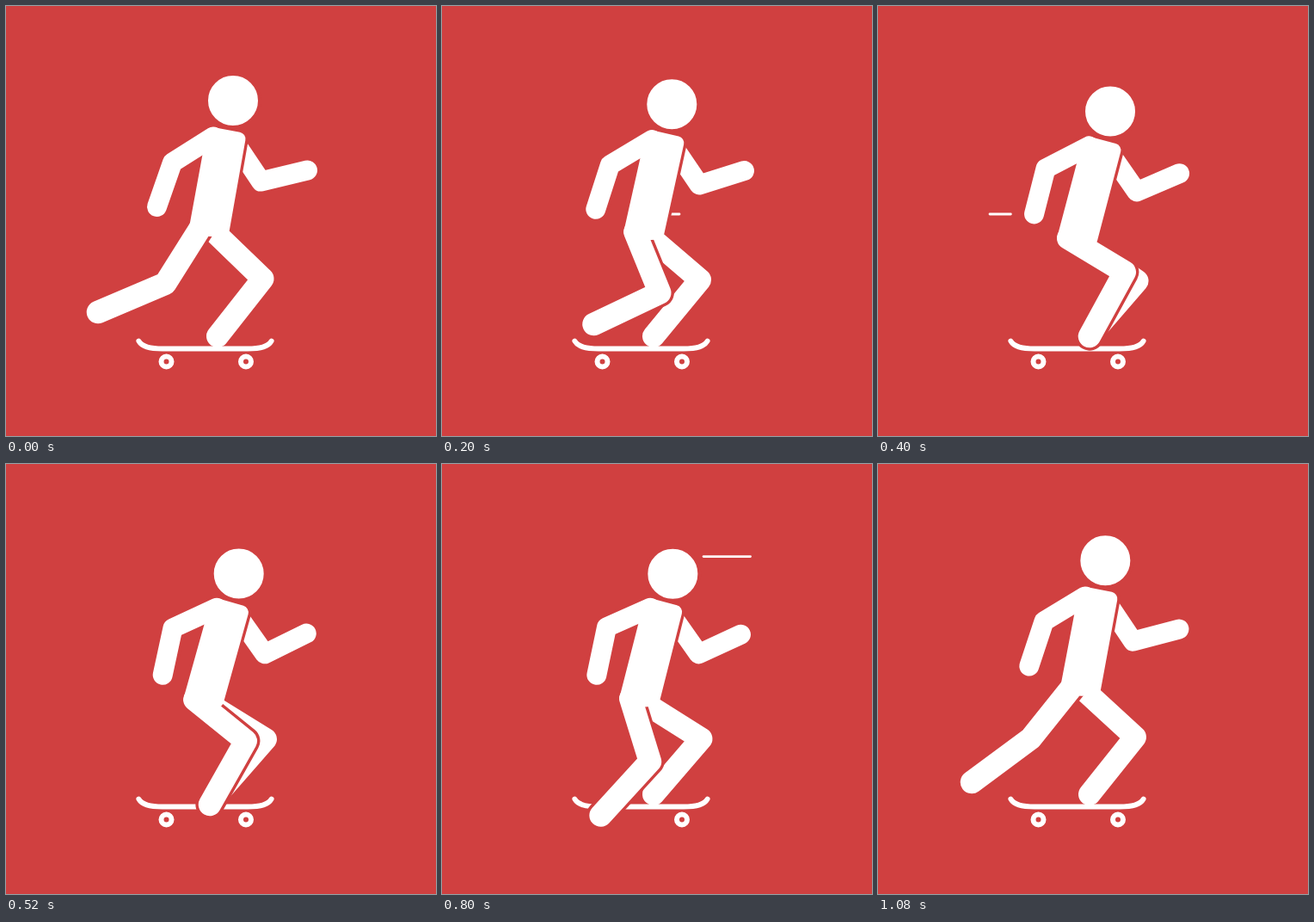
Recreate the animation shown at these times as an HTML page. Size 500 by 500 pixels, loop 1.12 s.

```html
<!DOCTYPE html>
<html lang="en">
<head>
<meta charset="utf-8">
<title>Skateboarder</title>
<style>
  html, body { margin: 0; width: 100%; height: 100%; overflow: hidden; background: #d04040; }
  svg { display: block; width: 100%; height: 100%; }
</style>
</head>
<body>
<svg id="stage" viewBox="0 0 500 500"></svg>
<script>
const RED = '#d04040', WHITE = '#fff';
const LOOP = 1120, STEP = 40, GAP = 6.8;
const THIGH = 76.5, SHIN = 85;
const stage = document.getElementById('stage');

function add(tag, attrs) {
  const el = document.createElementNS('http://www.w3.org/2000/svg', tag);
  for (const key in attrs) el.setAttribute(key, attrs[key]);
  return stage.appendChild(el);
}

const stroke = (color, width, fill = 'none') => ({
  fill, stroke: color, 'stroke-width': width, 'stroke-linecap': 'round', 'stroke-linejoin': 'round'
});
const limb = (width, color = WHITE) => add('polyline', stroke(color, width));
const body = (width, color) => add('polygon', stroke(color, width, color));

// Layers from back to front.
const lowStreak = add('path', stroke(WHITE, 2.8));
const highStreak = add('path', stroke(WHITE, 2.8));
const head = add('circle', { r: 31, fill: WHITE, stroke: RED, 'stroke-width': 4 });
add('path', {
  ...stroke(WHITE, 5.8),
  d: 'M154.3 389.5C158 396 166 398.5 182 398.5H281C297 398.5 305 396 308.7 389.5'
});
for (const cx of [186.5, 279]) add('circle', { cx, cy: 413.5, r: 6, ...stroke(WHITE, 6) });
const frontArm = limb(23);
const torsoEdge = body(16 + GAP, RED);
const farLeg = limb(26);
const backArmEdge = limb(23 + GAP, RED);
const nearLegEdge = limb(26.5 + GAP, RED);
const torso = body(16, WHITE);
const nearLeg = limb(26.5);
const backArm = limb(23);

// The pushing foot: forward onto the board, down, back along the ground, up.
const footPath = [
  [0, 107, 356], [400, 246, 384], [640, 228, 408],
  [920, 152, 409], [1080, 109, 370], [LOOP, 107, 356]
];

function footAt(t) {
  const next = footPath.findIndex(key => key[0] > t);
  const [t0, x0, y0] = footPath[next - 1], [t1, x1, y1] = footPath[next];
  const u = (t - t0) / (t1 - t0);
  return [x0 + (x1 - x0) * u, y0 + (y1 - y0) * u];
}

// Two-bone leg with the knee bent forward.
function leg(hip, foot) {
  const dx = foot[0] - hip[0], dy = foot[1] - hip[1];
  const reach = Math.hypot(dx, dy);
  const along = (THIGH ** 2 - SHIN ** 2 + reach ** 2) / (2 * reach);
  const bend = Math.sqrt(Math.max(0, THIGH ** 2 - along ** 2));
  const knee = shift(hip, (dx * along + dy * bend) / reach, (dy * along - dx * bend) / reach);
  return [hip, knee, foot];
}

const shift = ([x, y], dx, dy) => [x + dx, y + dy];

function place(points, ...shapes) {
  const text = points.map(p => p.map(v => v.toFixed(2)).join()).join(' ');
  for (const shape of shapes) shape.setAttribute('points', text);
}

// A streak's tail leaves 80 ms after its tip; both take 360 ms.
function streak(el, t, start, from, to, y) {
  const at = s => from + (to - from) * Math.min(1, Math.max(0, (t - s) / 360));
  const tip = at(start), tail = at(start + 80);
  el.setAttribute('d', tail - tip > 0.5 ? `M${tip} ${y}H${tail}` : '');
}

function draw(t) {
  // The body sinks, then rises, while swaying forward and back.
  const crouch = Math.max(0, Math.min((t - 100) / 537, (LOOP - t) / 407));
  const sway = Math.sin(2 * Math.PI * t / LOOP);
  const joint = (x, y, sinkX, sinkY, swayX = 0, swayY = 0) =>
    [x + sinkX * crouch + swayX * sway, y + sinkY * crouch + swayY * sway];

  const [headX, headY] = joint(264, 110, 8, 22.5, 2);
  const shoulder = joint(241, 149, 4.5, 19.5, 2.5);
  const hip = joint(226, 258, -8.5, 20, 0, 1);
  const backElbow = joint(193.5, 182, 0, 11, 2, 1);
  const backHand = joint(175.5, 233.5, 8, 15, 2);
  const frontElbow = joint(296.5, 204, 5, 21.5, 2);
  const frontHand = joint(350.5, 191, -2, 8, 1.5, -1);

  const lean = Math.atan2(shoulder[0] - hip[0], hip[1] - shoulder[1]) + 0.05;
  const chest = shift(shoulder, 30 * Math.cos(lean), 30 * Math.sin(lean));

  head.setAttribute('cx', headX);
  head.setAttribute('cy', headY);
  place([shoulder, chest, shift(hip, 26, 1), shift(hip, 12, 2), shift(hip, -5, 0)], torsoEdge, torso);
  place([shift(shoulder, 0, 3), backElbow, backHand], backArmEdge, backArm);
  place([shift(chest, -5, 3), frontElbow, frontHand], frontArm);
  place(leg(hip, footAt(t)), nearLegEdge, nearLeg);
  place(leg(shift(hip, 17.5, 6), [246, 384]), farLeg);

  streak(lowStreak, t, 0, 349, 130, 242);
  streak(highStreak, t, 640, 413, 168, 107.6);
}

const began = performance.now();
function frame() {
  const t = (performance.now() - began) % LOOP;
  draw(Math.floor(t / STEP) * STEP);
  requestAnimationFrame(frame);
}
draw(0);
requestAnimationFrame(frame);
</script>
</body>
</html>
```
